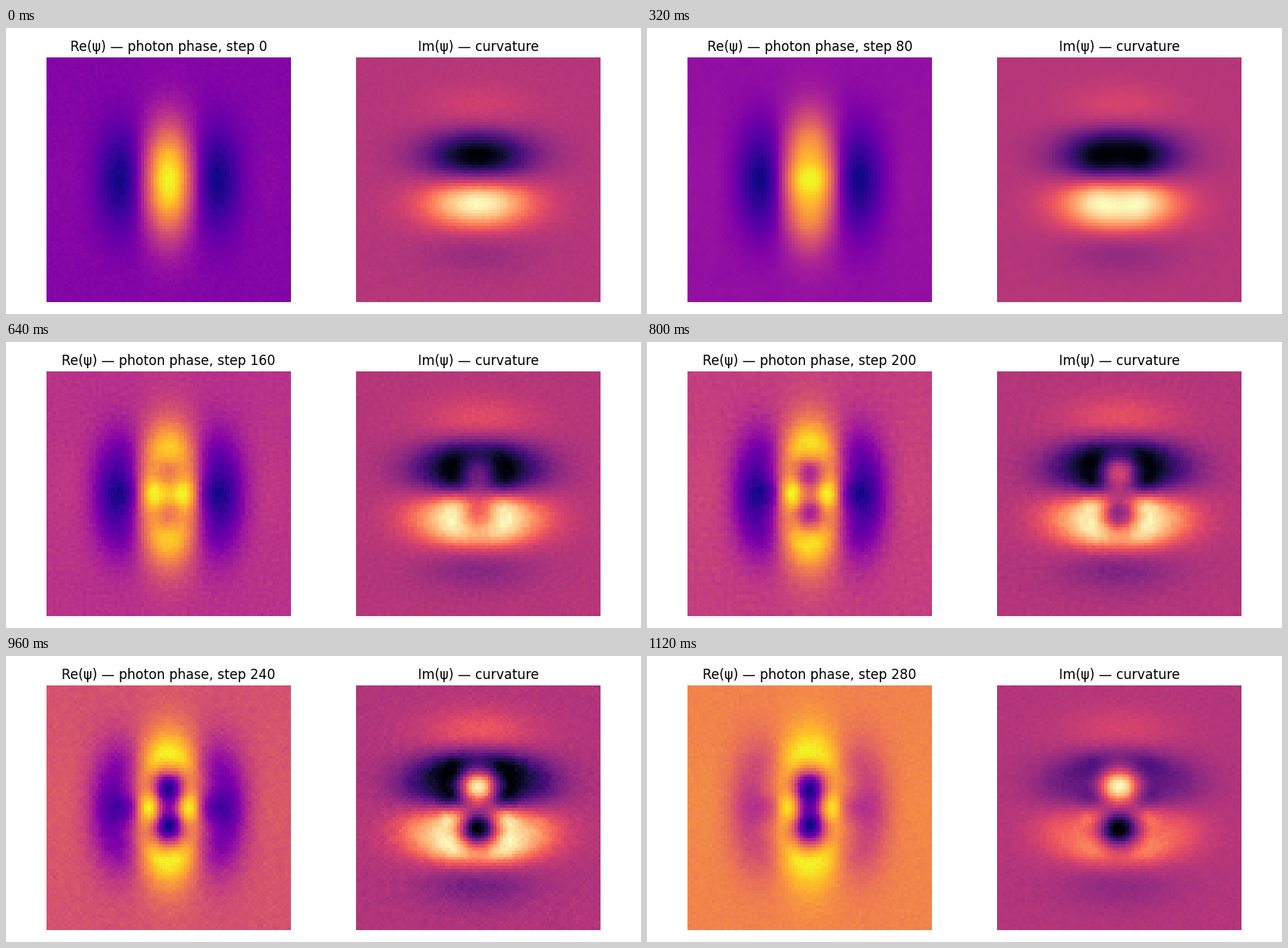
Animation of 800 by 360 pixels, one loop 1200 ms. Source, as a matplotlib script:

```python
import numpy as np
import matplotlib.pyplot as plt
from matplotlib.animation import FuncAnimation

W, H = 800, 360
N = 80             # grid cells per side
DT = 0.01
COUPLING = 0.7     # strength of the cubic term
FRAMES, STRIDE = 15, 20


def laplacian(f):
    return (np.roll(f, 1, 0) + np.roll(f, -1, 0)
            + np.roll(f, 1, 1) + np.roll(f, -1, 1) - 4 * f)


def initial_field():
    rng = np.random.default_rng(7)
    x, y = np.meshgrid(np.linspace(-1, 1, N), np.linspace(-1, 1, N))
    envelope = np.exp(-5 * (x**2 + y**2))
    noise = rng.normal(size=(N, N)) + 1j * rng.normal(size=(N, N))
    return envelope * (np.cos(2 * np.pi * x) + 1j * np.sin(2 * np.pi * y)) + 0.01 * noise


def simulate():
    """Nonlinear wave starting at rest, sampled every STRIDE steps."""
    psi = initial_field()
    vel = np.zeros_like(psi)
    states = [psi.copy()]
    for _ in range(FRAMES - 1):
        for _ in range(STRIDE):
            vel += DT * (laplacian(psi) - COUPLING * np.abs(psi)**2 * psi)
            psi += DT * vel
        states.append(psi.copy())
    return states


def add_panel(left, data, cmap):
    ax = fig.add_axes([left / W, 15 / H, 308 / W, 308 / H])
    ax.axis("off")
    image = ax.imshow(data, cmap=cmap, interpolation="nearest", aspect="auto")
    return ax, image


def show(image, data):
    image.set_data(data)
    image.set_clim(data.min(), data.max())


states = simulate()

plt.rcParams["font.family"] = "DejaVu Sans"
fig = plt.figure(figsize=(W / 100, H / 100), dpi=100, facecolor="white")
ax_re, im_re = add_panel(51, states[0].real, "plasma")
ax_im, im_im = add_panel(441, states[0].imag, "magma")
title = ax_re.set_title("", fontsize=12)
ax_im.set_title("Im(ψ) — curvature", fontsize=12)


def update(i):
    show(im_re, states[i].real)
    show(im_im, states[i].imag)
    title.set_text(f"Re(ψ) — photon phase, step {i * STRIDE}")
    return im_re, im_im, title


anim = FuncAnimation(fig, update, frames=FRAMES, interval=80,
                     repeat=True, repeat_delay=0, blit=False)
plt.show()
```
